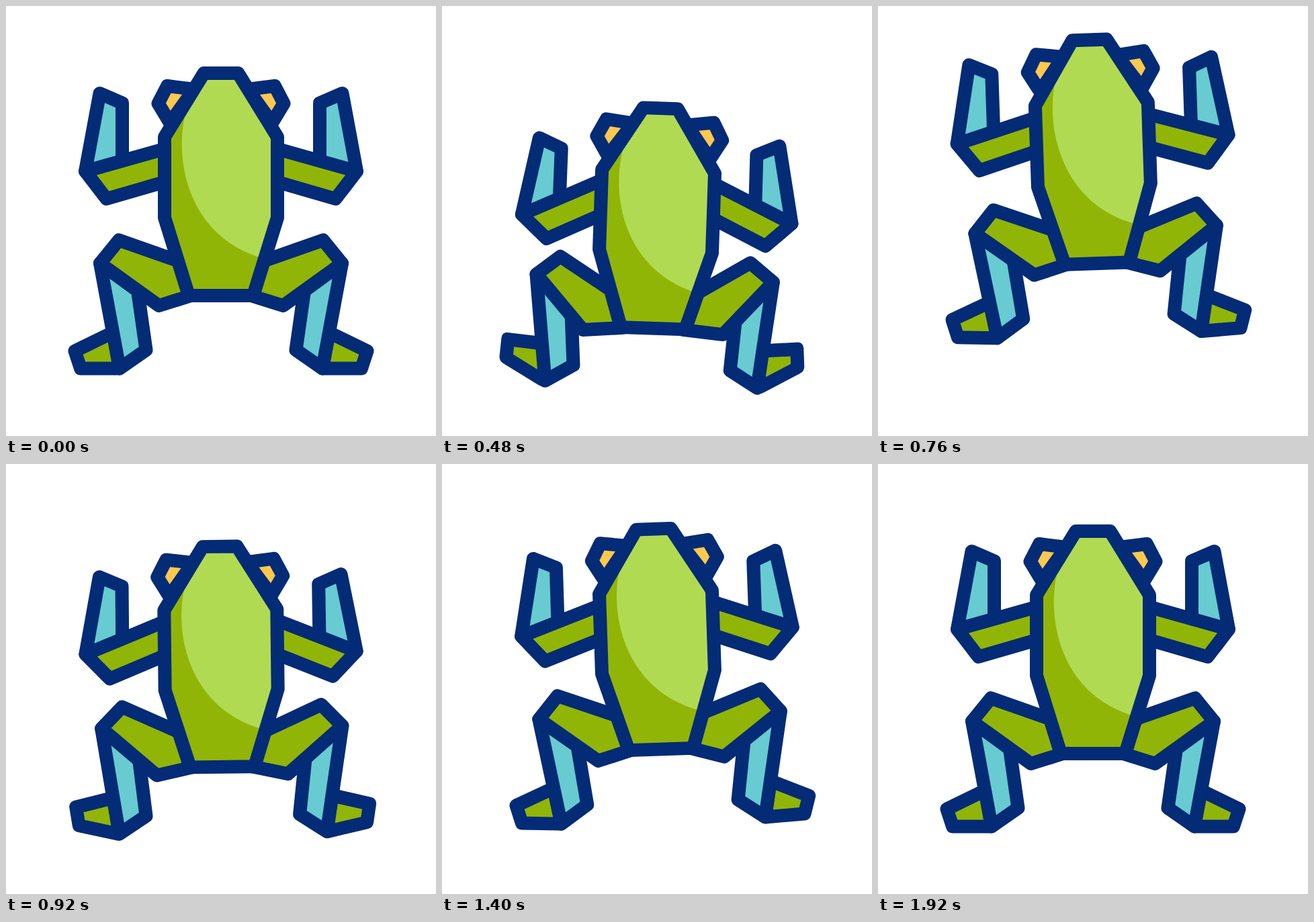
An HTML page without scripts that plays this animation: 640x640 px, repeating every 2 s.

```html
<!DOCTYPE html>
<html lang="en">
<head>
<meta charset="utf-8">
<title>Frog</title>
<style>
  @property --y { syntax: "<number>"; inherits: true; initial-value: 0; }
  @property --sway { syntax: "<number>"; inherits: true; initial-value: 0; }
  @property --curl { syntax: "<number>"; inherits: true; initial-value: 0; }
  @property --reach { syntax: "<number>"; inherits: true; initial-value: 0; }
  @property --tall { syntax: "<number>"; inherits: true; initial-value: 1; }

  html, body { margin: 0; width: 100%; height: 100%; overflow: hidden; background: #fff; }

  svg {
    display: block;
    width: 100%;
    height: 100%;
    --sine: cubic-bezier(.37, 0, .63, 1);
    animation: 2s var(--sine) infinite;
    animation-name: leap, sway, curl, reach, stretch;
  }

  /* vertical travel in px */
  @keyframes leap {
    0%, 11% { --y: 0; }
    21% { --y: 53; animation-timing-function: cubic-bezier(.6, 0, .64, 1); }
    36.7% { --y: -50.5; }
    47.5% { --y: 23; animation-timing-function: cubic-bezier(.6, 0, .64, 1); }
    64.7% { --y: -27; }
    74.5% { --y: 9; }
    95%, 100% { --y: 0; }
  }
  /* body tilt in degrees */
  @keyframes sway {
    0%, 13% { --sway: 0; }
    27.5%, 54%, 81% { --sway: 2.25; }
    40.5%, 67.5% { --sway: -2.3; }
    95%, 100% { --sway: 0; }
  }
  /* hind legs: 0 stretched, 1 drawn in */
  @keyframes curl {
    0%, 13% { --curl: 0; }
    27.5%, 54%, 81% { --curl: 1; }
    40.5%, 67.5% { --curl: 0; }
    95%, 100% { --curl: 0; }
  }
  /* arm angle in degrees */
  @keyframes reach {
    0%, 11% { --reach: 0; animation-timing-function: cubic-bezier(.3, .3, .6, 1); }
    27%, 53%, 79.5% { --reach: 10.2; }
    37%, 63.5% { --reach: .5; }
    95%, 100% { --reach: 0; }
  }
  @keyframes stretch {
    0%, 11% { --tall: 1; }
    18% { --tall: .989; }
    29%, 44%, 55%, 70%, 80% { --tall: .991; }
    37.5%, 64% { --tall: 1.006; }
    95%, 100% { --tall: 1; }
  }

  .frog { transform: translateY(calc(var(--y) * 1px)); }
  .turn { transform: rotate(calc(var(--sway) * 1deg)); transform-origin: 320px 258px; }
  .torso { transform: scaleY(var(--tall)); transform-origin: 320px 431px; }
  .leg { transform: rotate(calc(var(--curl) * 14.3deg)); transform-origin: 264px 387px; }
  .shin { transform: rotate(calc(var(--curl) * -9.8deg)); transform-origin: 140px 383px; }
  .foot {
    transform: skewY(calc(var(--curl) * 10deg)) rotate(calc(var(--curl) * 21deg));
    transform-origin: 169px 520px;
  }
  .arm { transform: rotate(calc(var(--reach) * -1deg)); transform-origin: 240px 250px; }
  .forearm { transform: rotate(calc(var(--reach) * 1.03deg)); transform-origin: 118px 246px; }

  .line { stroke: #042b76; stroke-width: 20; stroke-linejoin: round; stroke-linecap: round; }
  .green { fill: #91b507; }
  .lime { fill: #b1da53; }
  .cyan { fill: #67cbd1; }
  .gold { fill: #ffc84e; }
  .none { fill: none; }
</style>
</head>
<body>
<svg viewBox="0 0 640 640">
  <defs>
    <path id="body" d="M294.500 100H345.500L404 195V315L368 431H272L236 315V195Z"/>
    <g id="leg">
      <g class="leg line">
        <g class="shin">
          <path class="foot green" d="M102.500 513.500L111 539.500H169L163 484Z"/>
          <path class="cyan" d="M140 383L169 539.500L208.500 512L196 424Z"/>
        </g>
        <path class="green" d="M168 348.500L140 383L227.500 446L285 428L275 386Z"/>
      </g>
    </g>
    <g id="arm">
      <g class="arm line">
        <path class="forearm cyan" d="M118 246L139.500 130L173 144.500V240Z"/>
        <path class="green" d="M118 246L260 206V255L149.500 287Z"/>
      </g>
    </g>
    <path id="eye" class="line gold" d="M280 124L240 119L226.500 145L244 174Z"/>
  </defs>

  <g class="frog">
    <g class="turn">
      <use href="#leg"/>
      <g transform="translate(640) scale(-1 1)"><use href="#leg"/></g>
      <g class="torso">
        <use href="#arm"/>
        <use href="#eye"/>
        <g transform="translate(640) scale(-1 1)">
          <use href="#arm"/>
          <use href="#eye"/>
        </g>
        <use href="#body" class="green"/>
        <path class="lime" d="M266 165C251 232 272 345 384 376L404 315V195L345 100H295Z"/>
        <use href="#body" class="line none"/>
      </g>
    </g>
  </g>
</svg>
</body>
</html>
```
